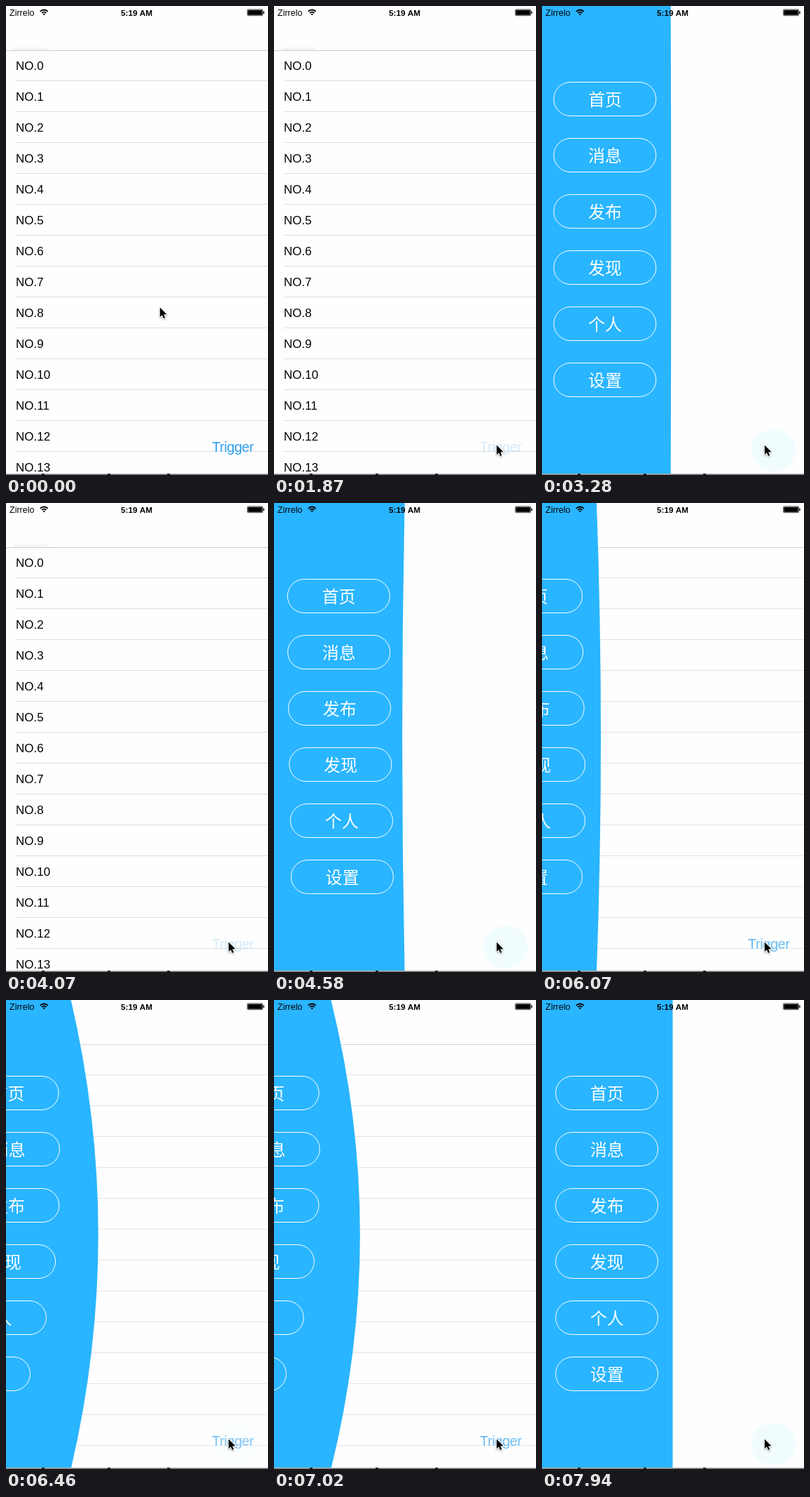
Write an HTML page with a canvas that moves like this. It is 374 by 668 pixels and loops after 8000 ms.

```html
<!DOCTYPE html>
<html lang="zh">
<head>
<meta charset="utf-8">
<title>Slide menu</title>
<style>
  html, body { margin: 0; width: 100%; height: 100%; overflow: hidden; background: #fefefe; }
  canvas { display: block; }
</style>
</head>
<body>
<canvas id="stage" width="374" height="668"></canvas>
<script>
const ctx = document.getElementById('stage').getContext('2d');
const W = 374, H = 668, LOOP = 8000;
const PAPER = '#fefefe', BLUE = '#29b5ff', TINT = '#2f9ff0';
const SANS = '"Liberation Sans", Arial, sans-serif';
const CJK = '"Noto Sans CJK SC", "Noto Sans CJK", "Noto Sans CJK JP", sans-serif';
const LABELS = ['首页', '消息', '发布', '发现', '个人', '设置'];

const EDGE = 186.5;      // resting right side of the menu
const TRAVEL = 237;      // distance the menu slides
const BULGE = 185;       // distance the two edge helpers travel
const BUTTON_LEAD = 190; // buttons start ahead of the slide

// Times at which the menu alternately opens and closes
const TOGGLES = [2095, 3262, 4225, 4800, 5790, 5980, 6290, 6570, 6860];
const PRESSES = [[1870, 2095], [4010, 4225], [5580, 5790]];

const clamp = x => Math.max(0, Math.min(1, x));
const smooth = x => { x = clamp(x); return x * x * (3 - 2 * x); };

// Remaining distance (1 to 0) of a 0.7 s damped spring
function spring(ms, damping, velocity) {
  if (ms <= 0) return 1;
  const t = ms / 1000, decay = 9.87;
  const w = decay / damping * Math.sqrt(1 - damping * damping);
  return Math.exp(-decay * t) * (Math.cos(w * t) + (decay - velocity) / w * Math.sin(w * t));
}

const slideRest = ms => 1 - smooth(ms / 300);
const sideRest = (ms, open) => spring(ms, open ? 0.5 : 0.6, 0.9);
const centerRest = (ms, open) => spring(ms, open ? 0.8 : 0.7, 2);

// Value after toggle i, each move starting from where the last one was
function follow(rest, i, t) {
  if (i < 0) return 0;
  const open = i % 2 === 0, goal = open ? 1 : 0;
  const from = follow(rest, i - 1, TOGGLES[i]);
  return goal + (from - goal) * rest(t - TOGGLES[i], open);
}

function text(str, x, y, font, color, align = 'left', spacing = 0) {
  ctx.font = font;
  ctx.fillStyle = color;
  ctx.textAlign = align;
  ctx.letterSpacing = spacing + 'px';
  ctx.fillText(str, x, y);
}

function box(x, y, w, h, color) {
  ctx.fillStyle = color;
  ctx.fillRect(x, y, w, h);
}

function pill(x, y, w, h, r) {
  ctx.beginPath();
  ctx.roundRect(x, y, w, h, r);
}

function drawList() {
  pill(11, 59, 48, 6, 2);
  ctx.fillStyle = '#f4f4f4';
  ctx.fill();
  box(0, 63, W, 1, '#cbcbcb');
  box(0, 64, W, 2, PAPER);
  for (let i = 0; i < 14; i++) {
    text('NO.' + i, 14, 91 + 44 * i, '17px ' + SANS, '#000');
    box(14, 106 + 44 * i, W - 14, 1, '#dedede');
  }
}

function drawTrigger(t) {
  let alpha = 1;
  for (const [down, up] of PRESSES)
    if (t >= down) alpha = 0.2 + 0.8 * clamp((t - up) / 200);
  ctx.globalAlpha = alpha;
  text('Trigger', 294, 635, '20px ' + SANS, TINT, 'left', -0.45);
  ctx.globalAlpha = 1;
}

function drawVeil(amount) {
  ctx.globalAlpha = amount;
  box(0, 0, W, H, PAPER);
  ctx.beginPath();
  ctx.ellipse(330.5, 632.5, 32, 30, 0, 0, 7);
  ctx.fillStyle = '#f1fcff';
  ctx.fill();
  ctx.globalAlpha = 1;
}

function drawMenu(x, bulge, buttonTime) {
  const edge = EDGE + x;
  ctx.beginPath();
  ctx.moveTo(-TRAVEL, 0);
  ctx.lineTo(edge, 0);
  ctx.quadraticCurveTo(edge + bulge, H / 2, edge, H);
  ctx.lineTo(-TRAVEL, H);
  ctx.fillStyle = BLUE;
  ctx.fill();

  ctx.strokeStyle = '#fff';
  ctx.lineWidth = 1;
  LABELS.forEach((label, i) => {
    const left = 19.5 + x - 90 * spring(buttonTime - 50 * i, 0.68, 0);
    const top = 108.5 + 80 * i;
    pill(left, top, 146, 48, 24);
    ctx.stroke();
    text(label, left + 73.2, top + 33.5, '300 24px ' + CJK, '#fff', 'center');
  });
}

function drawStatusBar() {
  text('Zirrelo', 5, 14, '12.5px ' + SANS, '#000');
  text('5:19 AM', 186.5, 13.7, 'bold 11.7px ' + SANS, '#000', 'center');

  ctx.strokeStyle = '#000';
  ctx.lineWidth = 1.8;
  for (const r of [4.3, 7.5]) {
    ctx.beginPath();
    ctx.arc(54.3, 13, r, -Math.PI * 0.76, -Math.PI * 0.24);
    ctx.stroke();
  }
  ctx.beginPath();
  ctx.moveTo(54.3, 13.5);
  ctx.arc(54.3, 13, 2.2, -Math.PI * 0.76, -Math.PI * 0.24);
  ctx.fill();

  ctx.lineWidth = 0.7;
  pill(344.4, 4.9, 22.2, 8.8, 1.5);
  ctx.stroke();
  box(345.3, 5.8, 20.4, 7, '#000');
  box(367.2, 7.7, 1.4, 3.2, '#000');
}

function drawBottomEdge() {
  box(0, 666, W, 1, '#b4b4b4');
  box(0, 667, W, 1, '#777');
  for (const x of [51, 145, 230]) box(x, 666, 4, 2, '#222');
}

function drawCursor(t) {
  const p = smooth((t - 790) / 540);
  ctx.save();
  ctx.translate(219.8 + 98 * p, 429.5 + 196 * p);
  ctx.beginPath();
  [[0, 0], [0, 13.5], [3.1, 10.7], [5.2, 15.6], [7.4, 14.6], [5.3, 9.9], [9.5, 9.6]]
    .forEach(([x, y]) => ctx.lineTo(x, y));
  ctx.closePath();
  ctx.lineJoin = 'round';
  ctx.lineWidth = 2;
  ctx.strokeStyle = '#fff';
  ctx.shadowColor = 'rgba(0,0,0,.35)';
  ctx.shadowBlur = 2;
  ctx.shadowOffsetY = 1;
  ctx.stroke();
  ctx.shadowColor = 'transparent';
  ctx.fillStyle = '#000';
  ctx.fill();
  ctx.restore();
}

function draw(t) {
  const last = TOGGLES.filter(at => at <= t).length - 1;
  const shown = follow(slideRest, last, t);
  const bulge = BULGE * (follow(sideRest, last, t) - follow(centerRest, last, t));

  box(0, 0, W, H, PAPER);
  drawList();
  drawTrigger(t);
  if (shown > 0) {
    const opened = TOGGLES[last - last % 2];
    drawVeil(shown ** 3);
    drawMenu(TRAVEL * (shown - 1), bulge, t - opened + BUTTON_LEAD);
  }
  drawStatusBar();
  drawBottomEdge();
  drawCursor(t);
}

function tick() {
  draw(performance.now() % LOOP);
  requestAnimationFrame(tick);
}
tick();
</script>
</body>
</html>
```
